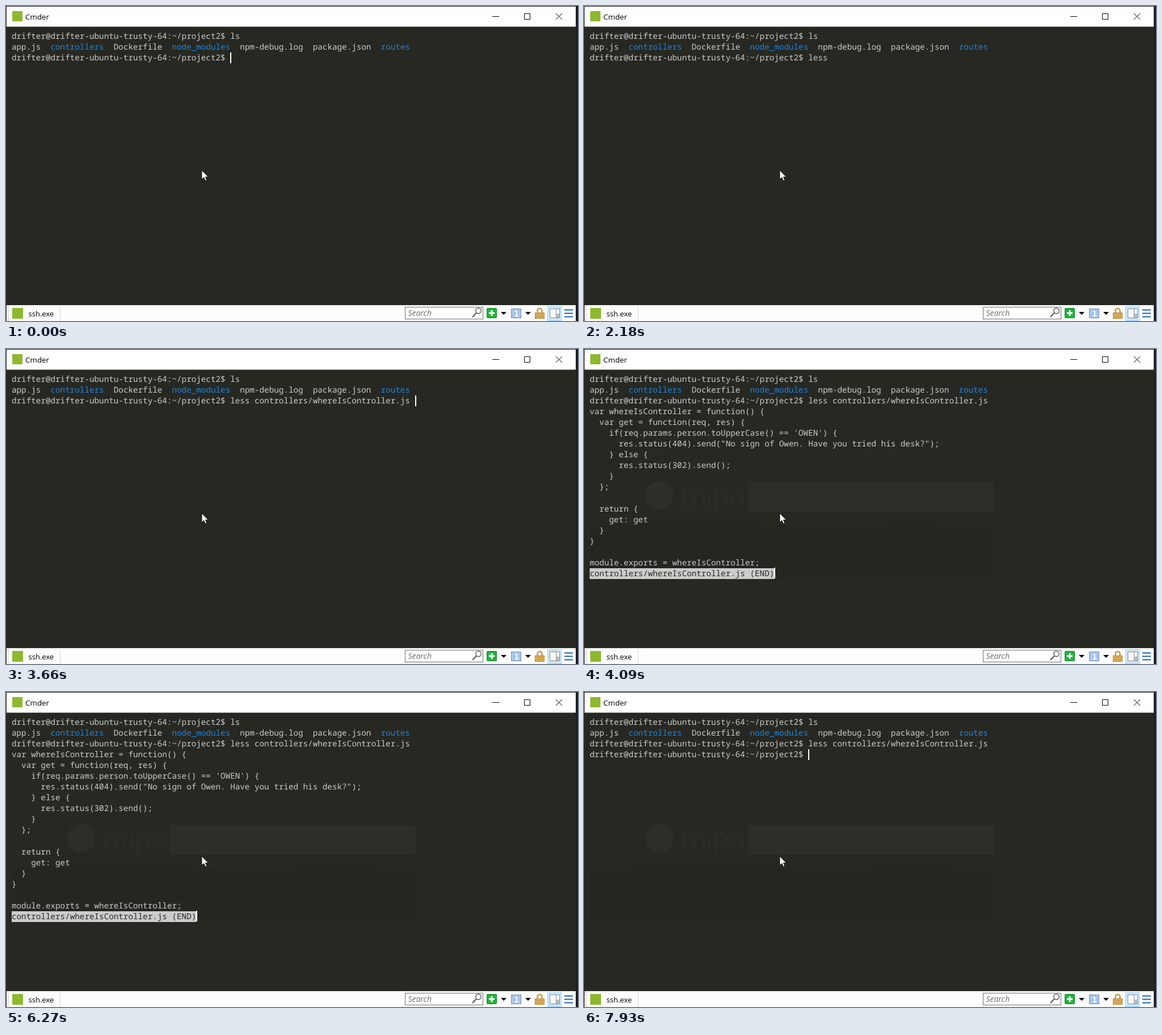
These frames come from a looping animation (1008x556 px, 8 s). An HTML page:

```html
<!DOCTYPE html>
<html lang="en">
<head>
<meta charset="utf-8">
<title>Terminal</title>
<style>
html, body { margin: 0; width: 100%; height: 100%; overflow: hidden; background: #272822; }
svg { position: absolute; left: 0; top: 0; font-family: "Open Sans", sans-serif; }
pre {
  position: absolute; left: 10px; top: 44px; margin: 0; color: #cccccc;
  font: 14.286px/19.05px "Noto Sans Mono", monospace;
  font-variant-ligatures: none; text-rendering: geometricPrecision;
}
pre b { font-weight: normal; color: #1d84e0; }
pre i { font-style: normal; color: #272822; background: #cccccc; }
#caret { position: absolute; width: 2px; height: 19px; background: #fff; }
</style>
</head>
<body>
<svg width="1008" height="556" viewBox="0 0 1008 556">
  <!-- faint page showing through the terminal -->
  <g id="ghost" fill="#2d2e29">
    <path d="M10 312 L110 308 L200 298 L290 304 L420 318 L560 304 L722 312 V405 H10Z" fill="#252620"/>
    <rect x="290" y="235" width="432" height="52"/>
    <circle cx="133" cy="258" r="25"/>
    <text x="171" y="276" font-size="50" font-weight="300">mipo</text>
  </g>

  <!-- window frame and title bar -->
  <path d="M0 0H1008V556H1004V1H1V556H0Z" fill="#1f2023"/>
  <rect x="1" y="1" width="1003" height="35.5" fill="#fff"/>
  <rect x="11" y="9" width="18" height="18" fill="#8db92e"/>
  <text x="34" y="24" font-size="13.4">Cmder</text>
  <path d="M857 18.5H869 M913.5 13.5H923.5V23.5H913.5Z M969 13L980 24 M980 13L969 24" fill="none" stroke="#000"/>

  <!-- status bar -->
  <rect x="1" y="528" width="1003" height="28" fill="#fdfdfd"/>
  <path d="M4.5 556V528.5 M95.5 530V556" stroke="#d5d5d5"/>
  <rect x="11" y="533" width="19" height="19" fill="#8db92e"/>
  <text x="39.5" y="548" font-size="13">ssh.exe</text>
  <rect x="703.5" y="531.5" width="137" height="21" fill="#fff" stroke="#6e6e6e"/>
  <text x="708.5" y="547" font-size="14" font-style="italic" fill="#6d6d6d">Search</text>
  <g fill="none" stroke="#555" stroke-width="1.4">
    <circle cx="832.5" cy="538" r="4.8"/>
    <path d="M829 541.5L822 549" stroke-width="2"/>
  </g>
  <rect x="847.5" y="533.5" width="17" height="17" rx="1" fill="#22b33c" stroke="#128a2a"/>
  <path d="M856 537V547 M851 542H861" stroke="#fff" stroke-width="3"/>
  <path d="M872 540H882L877 545Z M915 540H925L920 545Z"/>
  <rect x="890.5" y="534.5" width="17" height="16" fill="#a8c6e8" stroke="#6c93c4"/>
  <path d="M897 539H900V547 M897 547H903" fill="none" stroke="#fff" stroke-width="2"/>
  <path d="M936.5 542V537.5A4 3.5 0 0 1 944.5 537.5V542" fill="none" stroke="#c7994a" stroke-width="2.5"/>
  <rect x="932.5" y="541.5" width="16" height="10" fill="#dcae58" stroke="#b98632"/>
  <path d="M934 544.5H947 M934 548.5H947" stroke="#c18f3d"/>
  <rect x="954.5" y="530.5" width="24" height="25" fill="#cce8ff" stroke="#99d1ff"/>
  <path d="M958.5 534.5H975.5V550.5H958.5Z M969.5 534.5V550.5" fill="#fafafa" stroke="#8b8b8b"/>
  <path d="M970 543H975V550H970Z" fill="#bdbdbd"/>
  <path d="M984 536.5H999 M984 542.5H999 M984 548.5H999" stroke="#1c62ae" stroke-width="2"/>

  <!-- mouse pointer -->
  <path d="M345 290V306L348.7 302.6L351.2 308.3L353.8 307.2L351.4 301.7H356.4Z" fill="#fff" stroke="#000" stroke-width=".8"/>
</svg>
<pre id="screen"></pre>
<div id="caret"></div>
<script>
const LOOP = 8000, CHAR = 8.5716, ROW = 19.05;
const SHELL = 0, PAGER = 1, DONE = 2;
const prompt = 'drifter@drifter-ubuntu-trusty-64:~/project2$ ';
const command = 'less controllers/whereIsController.js ';
const listing = prompt + `ls
app.js  <b>controllers</b>  Dockerfile  <b>node_modules</b>  npm-debug.log  package.json  <b>routes</b>
` + prompt;
const file = `
var whereIsController = function() {
  var get = function(req, res) {
    if(req.params.person.toUpperCase() == 'OWEN') {
      res.status(404).send("No sign of Owen. Have you tried his desk?");
    } else {
      res.status(302).send();
    }
  };

  return {
    get: get
  }
}

module.exports = whereIsController;
<i>controllers/whereIsController.js (END)</i>`;

// start time, typed characters, caret visible, page
const steps = [
  [0, 0, 1, SHELL], [270, 0, 0, SHELL], [840, 0, 1, SHELL],
  [980, 1, 1, SHELL], [1100, 2, 1, SHELL], [1220, 3, 1, SHELL], [1350, 4, 1, SHELL],
  [1490, 5, 1, SHELL], [2180, 5, 0, SHELL], [2580, 5, 1, SHELL],
  [2710, 6, 1, SHELL], [2840, 7, 1, SHELL], [2980, 8, 1, SHELL],
  [3100, 17, 1, SHELL], [3660, 38, 1, SHELL],
  [4090, 38, 1, PAGER], [4650, 38, 0, PAGER], [5240, 38, 1, PAGER],
  [5670, 38, 0, PAGER], [6270, 38, 1, PAGER],
  [6790, 38, 1, DONE], [7370, 38, 0, DONE], [7930, 38, 1, DONE]
];
const caretRow = [2, 18, 3];
const tail = ['', file, '\n' + prompt];
const [screenEl, caretEl, ghostEl] = ['screen', 'caret', 'ghost'].map(id => document.getElementById(id));
let shown;

function show([, typed, caretOn, page]) {
  const col = page === PAGER ? 38 : prompt.length + (page === SHELL ? typed : 0);
  screenEl.innerHTML = listing + command.slice(0, typed) + tail[page];
  caretEl.style.left = Math.floor(10 + col * CHAR) + 'px';
  caretEl.style.top = Math.floor(44 + caretRow[page] * ROW) + 'px';
  caretEl.style.visibility = caretOn ? 'visible' : 'hidden';
  ghostEl.style.visibility = page === SHELL ? 'hidden' : 'visible';
}

const start = performance.now();
function tick() {
  const t = (performance.now() - start) % LOOP;
  const step = steps.findLast(s => s[0] <= t);
  if (step !== shown) show(shown = step);
  requestAnimationFrame(tick);
}
tick();
</script>
</body>
</html>
```
